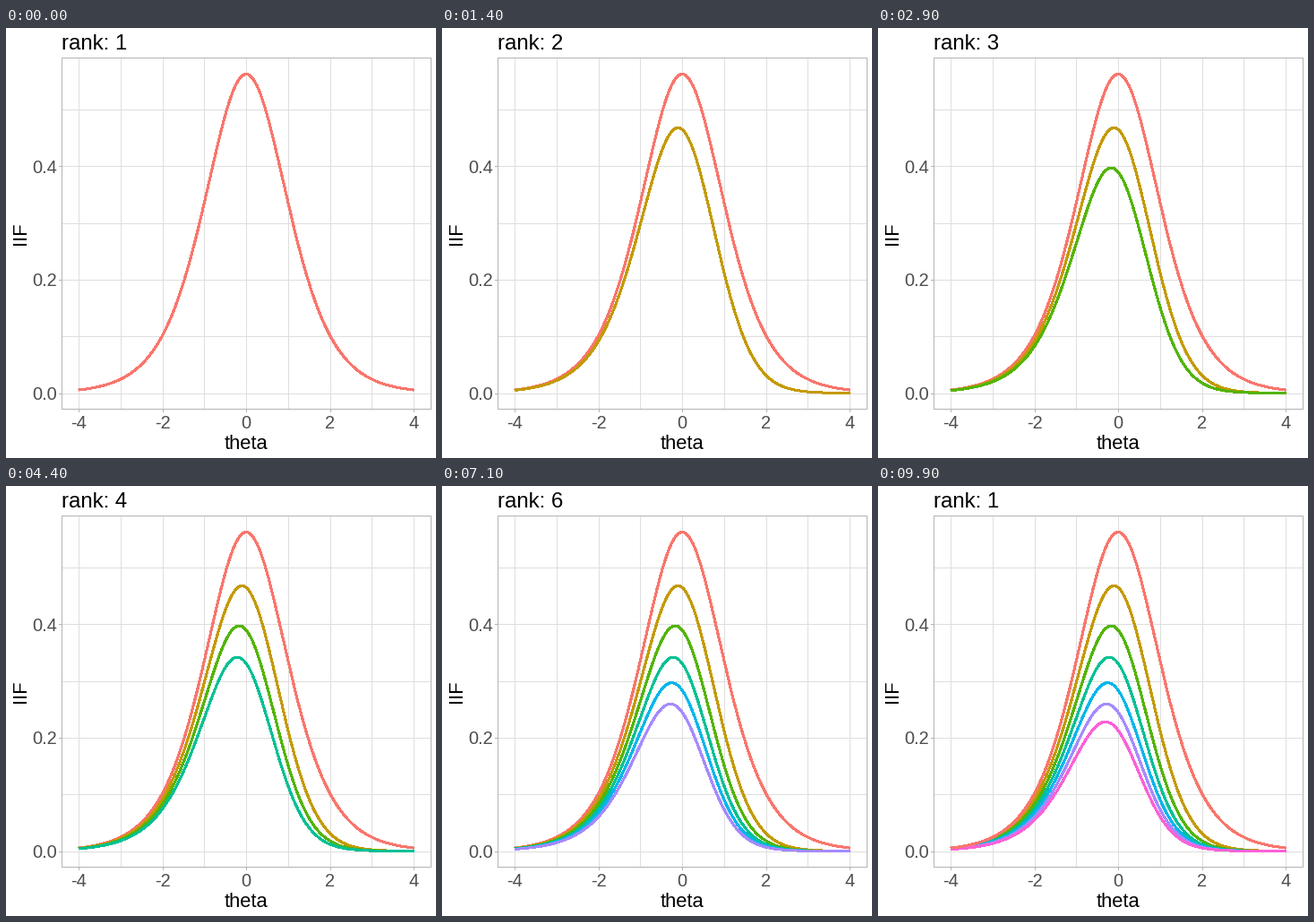
Recreate the animation shown at these times as a matplotlib script. Size 480 by 480 pixels, loop 10000 ms.

```python
import numpy as np
import matplotlib.pyplot as plt
from matplotlib.animation import FuncAnimation

plt.rcParams["font.family"] = "Liberation Sans"

SIZE, DPI = 480, 96
PT = 72 / DPI  # points per pixel
STEP_MS, LOOP_MS = 100, 10000
TITLE_TIMES = [0, 1200, 2700, 4200, 5500, 6900, 8300, 9700]
CURVE_DELAY = 200
COLORS = ["#F8766D", "#C49A00", "#53B400", "#00C094",
          "#00B6EB", "#A58AFF", "#FB61D7"]
LEFT, RIGHT, TOP, BOTTOM = 62, 474, 33, 425
GRID, FRAME, TICK_TEXT = "#DEDEDE", "#B3B3B3", "#4D4D4D"


def px_x(theta):
    return 268.1 + 46.75 * theta


def px_y(info):
    return 407.55 - 633 * info


def item_information(theta, upper, slope=1.5):
    """Information of a logistic item with the given upper asymptote."""
    s = 1 / (1 + np.exp(-slope * theta))
    return slope**2 * upper * s * (1 - s)**2 / (1 - upper * s)


# Axes whose data units are pixels, origin at the top left
fig = plt.figure(figsize=(SIZE / DPI, SIZE / DPI), dpi=DPI, facecolor="white")
ax = fig.add_axes([0, 0, 1, 1])
ax.set_xlim(0, SIZE)
ax.set_ylim(SIZE, 0)
ax.axis("off")


def rule(xs, ys, color, z):
    ax.plot(xs, ys, color=color, lw=PT, snap=True,
            solid_capstyle="projecting", zorder=z)


def label(x, y, text, px, color="black", **kw):
    kw = {"ha": "center", "va": "baseline", **kw}
    return ax.text(x, y, text, fontsize=px * PT, color=color, **kw)


for theta in range(-4, 5):
    x = round(px_x(theta))
    rule([x, x], [TOP, BOTTOM], GRID, 1)
    if theta % 2 == 0:
        rule([x, x], [BOTTOM + 1, BOTTOM + 3], FRAME, 1)
        label(px_x(theta), 447, str(theta), 20, TICK_TEXT)

for tenth in range(6):
    y = round(px_y(tenth / 10))
    rule([LEFT, RIGHT], [y, y], GRID, 1)
    if tenth in (0, 2, 4):
        rule([LEFT - 3, LEFT - 1], [y, y], FRAME, 1)
        label(57, px_y(tenth / 10) + 7.4, f"{tenth / 10:.1f}", 20, TICK_TEXT,
              ha="right")

rule([LEFT, RIGHT, RIGHT, LEFT, LEFT], [TOP, TOP, BOTTOM, BOTTOM, TOP], FRAME, 20)
label(268, 470, "theta", 22)
label(21.5, 229.2, "IIF", 22, rotation=90, rotation_mode="anchor")
title = label(62, 24, "", 24, ha="left")

# Without antialiasing every touched pixel is filled, so 2 px draws as 3
theta = np.linspace(-4, 4, 161)
curves = [
    ax.plot(px_x(theta), px_y(item_information(theta, np.exp(-0.1 * k))),
            color=color, lw=2 * PT, antialiased=False, snap=False,
            solid_capstyle="butt", solid_joinstyle="round")[0]
    for k, color in enumerate(COLORS)
]


def update(frame):
    t = frame * STEP_MS
    rank = sum(t >= start for start in TITLE_TIMES)
    title.set_text(f"rank: {(rank - 1) % len(COLORS) + 1}")
    for k, curve in enumerate(curves):
        curve.set_visible(k == 0 or t >= TITLE_TIMES[k] + CURVE_DELAY)
        curve.set_zorder(5 + k)
    # The first curve comes back on top as the cycle closes
    if t >= TITLE_TIMES[-1] + CURVE_DELAY:
        curves[0].set_zorder(15)
    return [title, *curves]


anim = FuncAnimation(fig, update, frames=LOOP_MS // STEP_MS,
                     interval=STEP_MS, repeat=True, repeat_delay=0)
plt.show()
```
